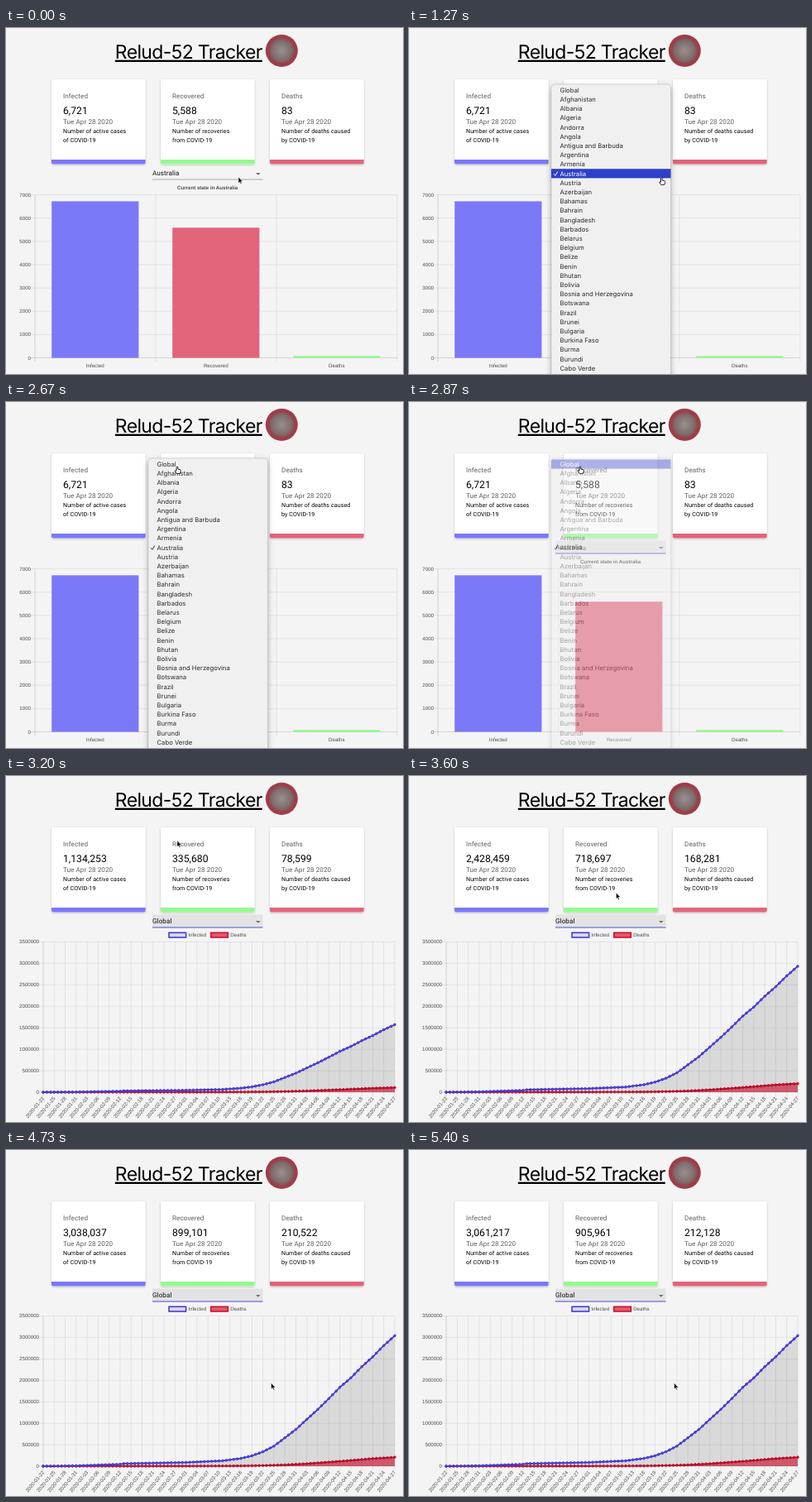
These frames come from a looping animation (480 px wide and 418 px high, 5470 ms). An HTML page:

```html
<!DOCTYPE html>
<html lang="en">
<head>
<meta charset="utf-8">
<title>Case dashboard</title>
<style>
  html, body { margin: 0; width: 100%; height: 100%; overflow: hidden; background: #f4f4f4; }
  svg { display: block; width: 100%; height: 100%; text-rendering: geometricPrecision; }
  .card { font-family: Roboto, sans-serif; font-size: 8.1px; letter-spacing: .00938em; fill: #111; }
  .card .soft { fill: #5e5e5e; }
  .card .value { font-size: 12.2px; letter-spacing: 0; fill: #000; }
  .card .note { font-size: 7.1px; letter-spacing: .0107em; fill: #000; }
  .axis { font: 6.15px "Liberation Sans", Arial, sans-serif; fill: #4a4a4a; }
  .grid { stroke: #000; stroke-opacity: .1; stroke-width: .7; fill: none; }
  .menu { font: 7.7px Inter, sans-serif; fill: #2b2b2b; }
  .title { font: 23px Inter, sans-serif; letter-spacing: -.65px; text-decoration: underline; }
</style>
</head>
<body>
<svg id="stage" viewBox="0 0 480 418" preserveAspectRatio="none"></svg>
<script>
const FPS = 15, LOOP = 5470;
const BLUE = '#7b78f8', GREEN = '#93fa8f', RED = '#e2647a';
const OPEN = 19, SWITCH = 46, START = 3033.356;

const cards = [
  { name: 'Infected', color: BLUE, note: ['Number of active cases', 'of COVID-19'], local: 6721, total: 3062556 },
  { name: 'Recovered', color: GREEN, note: ['Number of recoveries', 'from COVID-19'], local: 5588, total: 906357 },
  { name: 'Deaths', color: RED, note: ['Number of deaths caused', 'by COVID-19'], local: 83, total: 212221 }
];
const countries = ('Global,Afghanistan,Albania,Algeria,Andorra,Angola,Antigua and Barbuda,Argentina,Armenia,' +
  'Australia,Austria,Azerbaijan,Bahamas,Bahrain,Bangladesh,Barbados,Belarus,Belgium,Belize,Benin,Bhutan,' +
  'Bolivia,Bosnia and Herzegovina,Botswana,Brazil,Brunei,Bulgaria,Burkina Faso,Burma,Burundi,Cabo Verde').split(',');
const CHOSEN = countries.indexOf('Australia');

// [day, thousands]
const infected = [[0, 0.6], [9, 10], [21, 45], [22, 60], [39, 88], [49, 126], [54, 182], [57, 243], [60, 337],
  [63, 468], [66, 661], [69, 857], [72, 1092], [75, 1325], [78, 1576], [81, 1838], [84, 2057], [87, 2318],
  [90, 2549], [93, 2810], [96, 3041]];
const deaths = [[0, 0], [39, 3], [54, 7], [60, 15], [66, 30], [72, 58], [78, 95], [84, 134], [90, 177], [96, 208]];
// [frame, x, y]
const pointer = [[13, 281, 180], [17, 305, 181], [22, 306, 181], [26, 290, 148.5], [28, 290, 148.5],
  [31, 217, 101], [34, 208, 84], [37, 207, 78], [48, 207, 78], [54, 250.4, 141], [61, 320.6, 281.4]];

const clamp = (v, a = 0, b = 1) => Math.min(b, Math.max(a, v));
const range = n => Array.from({ length: n }, (_, i) => i);
const list = (n, fn) => range(n).map(fn).join('');
const text = (x, y, s, attrs = '') => `<text x="${x}" y="${y}" ${attrs}>${s}</text>`;
const rect = (x, y, w, h, attrs) => `<rect x="${x}" y="${y}" width="${w}" height="${h}" ${attrs}/>`;

function along(keys, t, col = 1) {
  if (t <= keys[0][0]) return keys[0][col];
  for (let i = 1; i < keys.length; i++) {
    const a = keys[i - 1], b = keys[i];
    if (t <= b[0]) return a[col] + (b[col] - a[col]) * (t - a[0]) / (b[0] - a[0]);
  }
  return keys[keys.length - 1][col];
}

function cardMarkup(c, i) {
  const x = 55 + 132 * i, tx = x + 14;
  return `<g class="card">
    ${rect(x, 62, 113.7, 102.4, 'rx="2" fill="#fff" filter="url(#lift)"')}
    <path d="M${x} 159.1h113.7v3.3q0 2-2 2h-109.7q-2 0-2-2z" fill="${c.color}"/>
    ${text(tx, 84.8, c.name, 'class="soft"')}
    ${text(tx, 103.8, '', `class="value" id="value${i}"`)}
    ${text(tx, 116.3, 'Tue Apr 28 2020', 'class="soft"')}
    ${text(tx, 127.3, c.note[0], 'class="note"')}
    ${text(tx, 137.6, c.note[1], 'class="note"')}
  </g>`;
}

function barChart() {
  const step = 197 / 7, base = 398.5;
  const rows = list(8, i => `M30 ${base - i * step}H473`);
  const cols = list(4, i => `M${35 + 146 * i} 201.5V403`);
  const bars = cards.map((c, i) => {
    const h = c.local * 197 / 7000;
    return rect(55.2 + 146 * i, base - h, 105.2, h, `fill="${[BLUE, RED, GREEN][i]}"`) +
      text(107.8 + 146 * i, 409.6, c.name, 'text-anchor="middle"');
  }).join('');
  return `<path class="grid" d="${rows + cols}"/><path class="grid" d="M30 ${base}H473M35 201.5V403"/>
    ${list(8, i => text(30, base + 2 - i * step, i * 1000, 'text-anchor="end"'))}${bars}
    ${text(243.6, 194.7, 'Current state in Australia', 'text-anchor="middle" font-weight="bold"')}`;
}

const dayX = d => 45 + d * 425 / 96;

function lineChart() {
  const step = 181.5 / 7, base = 382;
  const rows = list(8, i => `M40 ${base - i * step}H470`);
  const cols = list(33, i => `M${dayX(i * 3)} 200.5V387`);
  const dates = list(33, i => {
    const day = new Date(Date.UTC(2020, 0, 22 + i * 3)).toISOString().slice(0, 10);
    return `<text transform="translate(${dayX(i * 3)} 388.3) rotate(-50)" dy=".35em" text-anchor="end">${day}</text>`;
  });
  return `<path class="grid" d="${rows + cols}"/><path class="grid" d="M40 ${base}H470M45 200.5V387"/>
    ${list(8, i => text(40, base + 1.9 - i * step, i * 500000, 'text-anchor="end"'))}${dates}
    ${rect(197, 189.3, 20.6, 5.7, 'fill="#d8d8da" stroke="#3b32dc" stroke-width="1.5"')}
    ${text(220.3, 194.2, 'Infected')}
    ${rect(247.8, 189.3, 20.6, 5.7, 'fill="#e0586c" stroke="#cf0a28" stroke-width="1.5"')}
    ${text(271.2, 194.2, 'Deaths')}
    ${['deaths', 'infected'].map(id => {
      const [ink, fill, dot] = id === 'deaths'
        ? ['#cc0828', 'rgba(226,40,70,.7)', '#d01a38'] : ['#382dd2', 'rgba(0,0,0,.11)', '#564ed6'];
      return `<path id="${id}Area" fill="${fill}"/>
        <path id="${id}Line" fill="none" stroke="${ink}" stroke-width="1.6" stroke-linejoin="round"/>
        <path id="${id}Dots" fill="${dot}" stroke="${ink}" stroke-width=".8"/>`;
    }).join('')}`;
}

const ROW = 11.2, rowY = i => 75 + i * ROW;

function menuMarkup() {
  return `${rect(172, 68, 144.5, 370, 'rx="4" fill="#f0f0f0" stroke="#000" stroke-opacity=".22" stroke-width=".6" filter="url(#float)"')}
    ${rect(172, 0, 144.5, ROW, 'id="mark" fill="#2f40c8"')}
    ${countries.map((c, i) => text(182.5, rowY(i) + 2.8, c, `id="item${i}"`)).join('')}
    <path id="check" d="M175.2 ${rowY(CHOSEN) + .5}l1.6 2 3-4.8" fill="none" stroke-width="1"/>`;
}

document.getElementById('stage').innerHTML = `
  <defs>
    <filter id="lift" x="-10%" y="-10%" width="120%" height="125%">
      <feDropShadow dx="0" dy=".8" stdDeviation="1" flood-opacity=".25"/>
    </filter>
    <filter id="float" x="-15%" y="-5%" width="130%" height="110%">
      <feDropShadow dx="0" dy="3" stdDeviation="3.5" flood-opacity=".3"/>
    </filter>
    <radialGradient id="ball">
      <stop offset="0" stop-color="#99908f"/><stop offset=".62" stop-color="#7d6c6c"/>
      <stop offset=".82" stop-color="#96414a"/><stop offset="1" stop-color="#a83a45"/>
    </radialGradient>
  </defs>
  <rect width="480" height="418" fill="#f4f4f4"/>
  ${text(220.8, 36.7, 'Relud-52 Tracker', 'class="title" text-anchor="middle"')}
  <circle cx="333.3" cy="27.4" r="19.5" fill="url(#ball)"/>
  ${cards.map(cardMarkup).join('')}
  <g class="card">
    ${rect(177, 167.5, 133.5, 15.3, 'id="focus" fill="#e3e3e5"')}
    <path id="rule" d="M177 183H310.5"/>
    ${text(177, 178.2, '', 'id="choice"')}
    <path d="M302 175h5.6l-2.8 2.8z" fill="#707070"/>
  </g>
  <g id="bars" class="axis">${barChart()}</g>
  <g id="lines" class="axis">${lineChart()}</g>
  <g id="menu" class="menu">${menuMarkup()}</g>
  <path id="arrow" d="M0 0V7.4L1.7 5.9 2.8 8.6 4 8.1 2.9 5.5H5.2Z" fill="#000" stroke="#fff" stroke-width=".5"/>
  <path id="hand" d="M-.9.6Q0-.6.8.6V3L3.9 3.8Q4.6 4.3 4.2 5.6L3.4 8.4H-.8L-2.8 5.2Q-2.8 4.2-.9 5.2Z"
    fill="#fff" stroke="#111" stroke-width=".9" stroke-linejoin="round"/>`;

const el = {};
document.querySelectorAll('[id]').forEach(n => { el[n.id] = n; });
const set = (id, attrs) => { for (const k in attrs) el[id].setAttribute(k, attrs[k]); };
const show = (id, on) => set(id, { visibility: on ? 'visible' : 'hidden' });

function plot(id, keys, grow) {
  const pts = range(97).map(d =>
    [dayX(d).toFixed(2), (382 - along(keys, d) * grow * 181.5 / 3500).toFixed(2)]);
  const line = 'M' + pts.map(p => p.join(' ')).join('L');
  set(id + 'Line', { d: line });
  set(id + 'Area', { d: line + 'V382H45Z' });
  set(id + 'Dots', { d: pts.map(([x, y]) => `M${x - 1.35} ${y}a1.35 1.35 0 1 0 2.7 0a1.35 1.35 0 1 0-2.7 0`).join('') });
}

function draw(ms) {
  const k = Math.floor((ms + 3.4) * FPS / 1000);
  const since = k * 1000 / FPS - START;
  const global = k >= SWITCH;

  const u = clamp(since / 2500);
  const count = (1 - 2 ** (-10 * u)) * 1024 / 1023;
  cards.forEach((c, i) => {
    el['value' + i].textContent = Math.round(global ? c.total * count : c.local).toLocaleString('en-US');
  });

  show('bars', !global);
  show('lines', global);
  if (global) {
    const grow = 1 - (1 - clamp(since / 1000)) ** 4;
    plot('infected', infected, grow);
    plot('deaths', deaths, grow);
  }

  const focused = k >= OPEN, hover = clamp((k - 6) / 3);
  show('focus', focused);
  set('rule', {
    stroke: focused ? '#5148cc' : '#000',
    'stroke-opacity': focused ? 1 : .45 + .35 * hover,
    'stroke-width': focused ? 1.1 : .7 + .3 * hover
  });
  el.choice.textContent = global ? 'Global' : 'Australia';

  const fade = k < OPEN ? 0 : clamp(1 - (k - 41) * .3);
  const row = k === 40 ? -1 : Math.max(0, Math.round((along(pointer, k - .5, 2) - 75) / ROW));
  set('menu', { opacity: fade });
  show('menu', fade > 0);
  set('mark', { y: rowY(row) - ROW / 2, opacity: row < 0 ? 0 : 1 });
  countries.forEach((_, i) => set('item' + i, { fill: i === row ? '#fff' : '#2b2b2b' }));
  set('check', { stroke: row === CHOSEN ? '#fff' : '#2b2b2b' });

  const hand = k >= OPEN && k < SWITCH;
  const at = `translate(${along(pointer, k, 1)} ${along(pointer, k, 2)})`;
  set('arrow', { transform: at, visibility: hand ? 'hidden' : 'visible' });
  set('hand', { transform: at, visibility: hand ? 'visible' : 'hidden' });
}

const begin = performance.now();
function tick() {
  draw((performance.now() - begin) % LOOP);
  requestAnimationFrame(tick);
}
tick();
</script>
</body>
</html>
```
